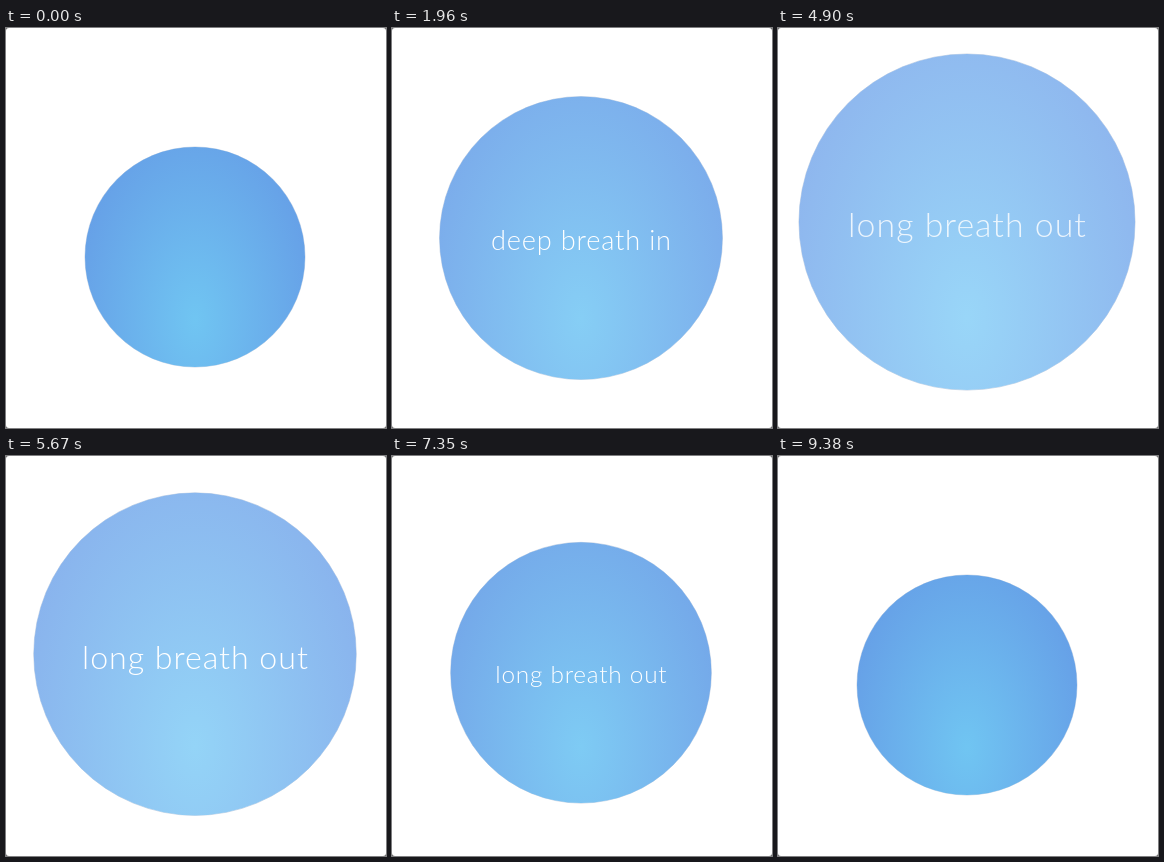
Write an HTML page with a canvas that moves like this. It is 380x400 px and loops after 9450 ms.

```html
<!DOCTYPE html>
<html lang="en">
<head>
<meta charset="utf-8">
<title>Breathing</title>
<style>
  html, body { margin: 0; width: 100%; height: 100%; overflow: hidden; background: #fff; }
  canvas { display: block; width: 380px; height: 400px; }
</style>
</head>
<body>
<canvas id="stage" width="380" height="400"></canvas>
<script>
const ctx = document.getElementById('stage').getContext('2d');
const LOOP = 9450;
const STEP = 70;
const CENTER_X = 189;
const FONT_SIZE = 34;

const INNER = [[112, 197, 242], [153, 214, 248]];
const OUTER = [[102, 160, 231], [142, 182, 238]];

const lerp = (a, b, k) => a + (b - a) * k;
const mix = ([a, b], k) => `rgb(${a.map((v, i) => Math.round(lerp(v, b[i], k)))})`;

// Sine ease-in-out from 0 to 1 between two times
function ease(t, from, to) {
  const p = Math.min(1, Math.max(0, (t - from) / (to - from)));
  return (1 - Math.cos(Math.PI * p)) / 2;
}

function drawStage() {
  ctx.fillStyle = '#666';
  ctx.fillRect(0, 0, 380, 400);
  ctx.fillStyle = '#fff';
  ctx.beginPath();
  ctx.roundRect(0, 0, 380, 400, 3);
  ctx.fill();
}

function drawBall(breath) {
  const radius = lerp(110, 168.6, breath);
  const y = lerp(229, 193.7, breath);

  ctx.save();
  ctx.beginPath();
  ctx.arc(CENTER_X, y, radius, 0, Math.PI * 2);
  ctx.strokeStyle = 'rgba(95, 130, 175, 0.3)';
  ctx.lineWidth = 1;
  ctx.stroke();
  ctx.clip();

  // Tall elliptical glow centred low in the ball
  ctx.translate(CENTER_X, y + radius * 0.57);
  ctx.scale(radius * 1.12, radius * 1.85);
  const glow = ctx.createRadialGradient(0, 0, 0, 0, 0, 1);
  glow.addColorStop(0, mix(INNER, breath));
  glow.addColorStop(1, mix(OUTER, breath));
  ctx.fillStyle = glow;
  ctx.fillRect(-2, -2, 4, 4);
  ctx.restore();
}

function drawLabel(text, breath, alpha) {
  if (alpha <= 0) return;
  const scale = lerp(0.568, 1, breath);
  const spacing = FONT_SIZE * 0.03;
  ctx.save();
  ctx.globalAlpha = alpha;
  ctx.fillStyle = '#fff';
  ctx.translate(CENTER_X, lerp(237, 209, breath));
  ctx.scale(scale, scale);
  ctx.font = `300 ${FONT_SIZE}px Lato, "Open Sans", sans-serif`;
  ctx.letterSpacing = `${spacing}px`;
  ctx.textAlign = 'center';
  ctx.fillText(text, spacing / 2, 0);
  ctx.restore();
}

function render(t) {
  const breath = ease(t, 300, 3470) - ease(t, 4620, 9180);
  drawStage();
  drawBall(breath);
  drawLabel('deep breath in', breath, ease(t, 300, 1300) - ease(t, 3050, 4060));
  drawLabel('long breath out', breath, ease(t, 4250, 5150) - ease(t, 8400, 9450));
}

const start = performance.now();
function tick() {
  const t = (performance.now() - start) % LOOP;
  render(Math.floor(t / STEP) * STEP);
  requestAnimationFrame(tick);
}
tick();
</script>
</body>
</html>
```
